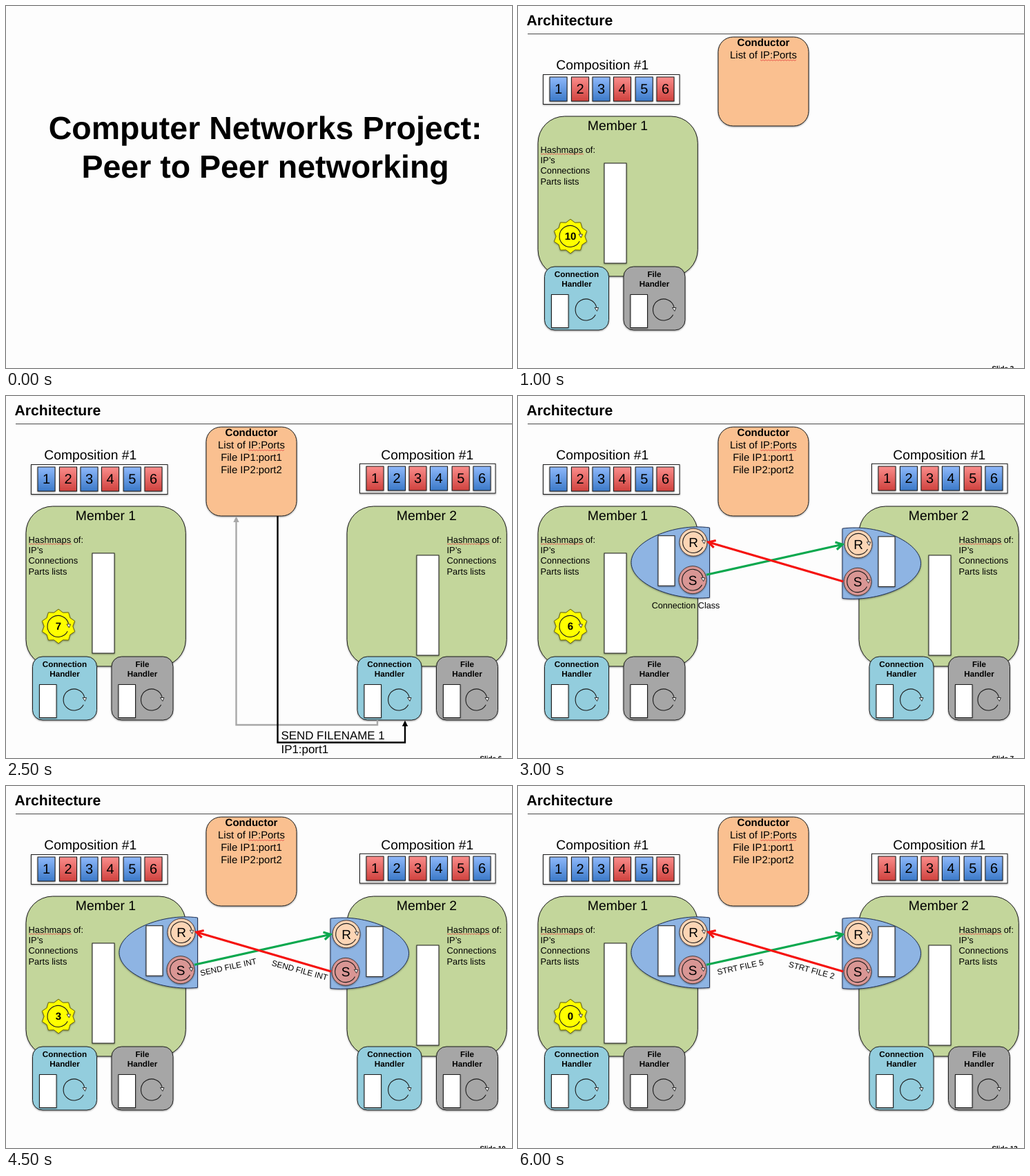
An HTML page that plays this animation: 733x525 px, repeating every 6.5 s.

```html
<!DOCTYPE html>
<html lang="en">
<head>
<meta charset="utf-8">
<title>Peer to Peer networking</title>
<style>
html, body { margin: 0; width: 100%; height: 100%; overflow: hidden; background: #fdfdfd; }
svg { display: block; width: 733px; height: 525px; font-family: "Liberation Sans", Arial, sans-serif; text-rendering: geometricPrecision; }
.shade { filter: drop-shadow(0 1.5px 1px rgba(0,0,0,.4)); }
</style>
</head>
<body>
<svg id="stage" viewBox="0 0 733 525" xmlns="http://www.w3.org/2000/svg">
<defs>
<linearGradient id="blue" x2="0" y2="1"><stop stop-color="#8fb9fb"/><stop offset="1" stop-color="#3b79c8"/></linearGradient>
<linearGradient id="red" x2="0" y2="1"><stop stop-color="#fa8d8b"/><stop offset="1" stop-color="#cf423e"/></linearGradient>
</defs>
</svg>
<script>
const STEP = 500, SLIDES = 13, INK = '#1c1c1c';
const stage = document.getElementById('stage');
const scenes = [];

function add(parent, tag, attrs, content) {
  const el = document.createElementNS('http://www.w3.org/2000/svg', tag);
  for (const k in attrs) el.setAttribute(k, attrs[k]);
  if (content !== undefined) el.textContent = content;
  parent.appendChild(el);
  return el;
}

// A group visible on slides first..last
function scene(first, last = SLIDES - 1) {
  const el = add(stage, 'g', {});
  scenes.push({ el, first, last });
  return el;
}

function text(g, x, y, size, str, opt = {}) {
  return add(g, 'text', { x, y, 'font-size': size, 'text-anchor': 'middle', ...opt }, str);
}
const bold = { 'font-weight': 700 };
const left = { 'text-anchor': 'start' };

function box(g, x, y, width, height, fill = '#fff', rx = 0) {
  return add(g, 'rect', { x, y, width, height, rx, fill, stroke: INK, class: 'shade' });
}

function line(g, d, stroke, width) {
  return add(g, 'path', { d, fill: 'none', stroke, 'stroke-width': width });
}

function squiggle(g, x1, x2, y) {
  let d = `M${x1} ${y}`;
  for (let x = x1 + 2, i = 0; x <= x2; x += 2, i++) d += `L${x} ${y + (i % 2 ? 0 : 1.4)}`;
  line(g, d, '#e8403c', 0.8);
}

function spin(g, x, y, r) {
  const at = deg => {
    const a = deg * Math.PI / 180;
    return `${x + r * Math.cos(a)} ${y + r * Math.sin(a)}`;
  };
  line(g, `M${at(28)}A${r} ${r} 0 1 1 ${at(-14)}`, INK, 1.1);
  add(g, 'path', { d: `M${x + r - 3} ${y - 3}h5.4l-2 5z`, fill: '#fff', stroke: INK, 'stroke-width': 0.9 });
}

function star(g, x, y, r) {
  const pts = [];
  for (let i = 0; i < 20; i++) {
    const a = i * Math.PI / 10 - Math.PI / 2, q = i % 2 ? r * 0.84 : r;
    pts.push([x + q * Math.cos(a), y + q * Math.sin(a)]);
  }
  add(g, 'polygon', { points: pts.join(' '), fill: '#ff0', stroke: '#6b6500', class: 'shade' });
}

function blocks(g, x, y) {
  return [0, 31.5, 62, 92.5, 124.2, 155].map((dx, i) => {
    const tile = box(g, x + dx, y, 25, 35);
    text(g, x + dx + 12.6, y + 24, 20, i + 1);
    return tile;
  });
}

function member(g, n, x, listX, queueX, queueY) {
  box(g, x, 160, 231.3, 232, '#c3d69b', 38.6);
  text(g, x + 115.5, 180, 19.4, 'Member ' + n);
  squiggle(g, listX, listX + 62, 214);
  ['Hashmaps of:', 'IP’s', 'Connections', 'Parts lists'].forEach((s, i) =>
    text(g, listX - 0.5, 212.7 + i * 15.3, 12.9, s, left));
  box(g, queueX, queueY, 32, 145);
}

function handlers(g, dx) {
  const make = (x, w, fill, name, spinX) => {
    box(g, x, 378, w, 92, fill, 14.5);
    text(g, x + w / 2, 392.6, 11.7, name, bold);
    text(g, x + w / 2, 406.7, 11.7, 'Handler', bold);
    box(g, x + 10, 418.5, 24.5, 48);
    spin(g, spinX, 440.5, 15.5);
  };
  make(38.5 + dx, 93, '#93cddd', 'Connection', 98.6 + dx);
  make(153 + dx, 89, '#a6a6a6', 'File', 211 + dx);
}

function worker(g, x, y, fill, letter) {
  add(g, 'circle', { cx: x, cy: y, r: 20, fill, stroke: '#4a3a36', class: 'shade' });
  spin(g, x, y, 15.3);
  text(g, x, y + 7, 19, letter);
}

// Connection class: D-shape, queue and the two workers
function link(g, edge, dir, queueX, y, xr, yr) {
  const px = d => edge + dir * d;
  add(g, 'path', {
    d: `M${edge} ${y + 1.5}C${px(52)} ${y - 5.5} ${px(113.5)} ${y + 21} ${px(113.5)} ${y + 52}` +
       `S${px(52)} ${y + 108.5} ${edge} ${y + 102.8}Z`,
    fill: '#8eb4e3', stroke: '#1d2f55', class: 'shade'
  });
  box(g, queueX, y + 13.2, 24, 72.5);
  worker(g, xr, yr, '#fcd5b5', 'R');
  worker(g, xr - 1, yr + 54.5, '#d99694', 'S');
}

function ray(g, x1, y1, x2, y2, color) {
  line(g, `M${x1} ${y1}L${x2} ${y2}`, color, 3.2);
  const a = Math.atan2(y2 - y1, x2 - x1);
  const wing = s => `${x2 - 11 * Math.cos(a + s)} ${y2 - 11 * Math.sin(a + s)}`;
  line(g, `M${wing(0.52)}L${x2} ${y2}L${wing(-0.52)}`, color, 3.2);
}

function route(g, d, x, y, color) {
  line(g, d, color, 2.4);
  add(g, 'path', { d: `M${x} ${y}l4.2 8.5h-8.4z`, fill: color });
}

function messages(g, a, b) {
  text(g, 0, 4.2, 11.8, a, { transform: 'translate(322 262.5) rotate(-12.3)' });
  text(g, 0, 4.2, 11.8, b, { transform: 'translate(425.5 267) rotate(15)' });
}

let g = scene(0, 0);
text(g, 375.6, 193, 46.5, 'Computer Networks Project:', bold);
text(g, 375.6, 249, 46.5, 'Peer to Peer networking', bold);

g = scene(1);
text(g, 12.5, 28, 21.2, 'Architecture', { ...left, ...bold });
line(g, 'M14 40.5H733', '#4a4a4a', 1);
const page = text(g, 686.5, 529.2, 9.9, '', { ...left, ...bold });
box(g, 290, 45, 131, 129, '#fac090', 21.5);
text(g, 355.5, 58.3, 15, 'Conductor', bold);
text(g, 355.5, 76, 14.9, 'List of IP:Ports');
squiggle(g, 351, 404, 78);
text(g, 122.3, 92, 19.3, 'Composition #1');
box(g, 36.5, 99.5, 197.5, 43);
const tilesA = blocks(g, 46, 103);
member(g, 1, 29, 33, 125, 228);

g = scene(2);
handlers(g, 0);
star(g, 76, 334, 24.8);
spin(g, 75.5, 334, 15.5);
const count = text(g, 76, 338.7, 15, '', bold);

text(scene(3), 355.5, 93.7, 14.9, 'File IP1:port1');

g = scene(3, 4);
route(g, 'M108.5 470V496.5H333.5V180', 333.5, 174.5, '#000');
text(g, 220.5, 490.3, 16.9, 'DOWN FILENAME PORT');

g = scene(4, 4);
route(g, 'M393.5 174V540H60.5V476', 60.5, 470.5, '#000');
text(g, 190.5, 520.6, 16.9, 'NONE FILENAME');

g = scene(5);
text(g, 355.5, 111.5, 14.9, 'File IP2:port2');
text(g, 610.3, 92, 19.3, 'Composition #1');
box(g, 512.5, 98.3, 196.5, 42.7);
const tilesB = blocks(g, 522, 102);
member(g, 2, 494, 639, 595, 231);
handlers(g, 470.5);

g = scene(5, 5);
route(g, 'M538 470V477H333.5V180', 333.5, 174.5, '#a8a8a8');
route(g, 'M393.5 174V502.5H578V476', 578, 470.5, '#000');
text(g, 398.5, 497.8, 16.9, 'SEND FILENAME 1', left);
text(g, 398.5, 518, 16.9, 'IP1:port1', left);

g = scene(6);
link(g, 277.5, -1, 203, 189.5, 254, 212.2);
link(g, 470, 1, 522, 190.7, 493, 214.8);
ray(g, 273, 259.3, 470, 215.3, '#0ba84e');
ray(g, 471, 269, 276, 212, '#f5120f');

g = scene(6, 7);
text(g, 243, 307.5, 12.6, 'Connection Class');

g = scene(7, 8);
add(g, 'rect', { x: 203, y: 257.5, width: 24, height: 16, fill: '#00b050', stroke: INK });
add(g, 'rect', { x: 522, y: 259, width: 24, height: 16, fill: '#00b050', stroke: INK });

messages(scene(9, 10), 'SEND FILE INT', 'SEND FILE INT');
messages(scene(11), 'STRT FILE 5', 'STRT FILE 2');

function paint(tiles, owned) {
  tiles.forEach((t, i) => t.setAttribute('fill', owned.includes(i + 1) ? 'url(#blue)' : 'url(#red)'));
}

let shown = -1;
function draw(ms) {
  const n = Math.floor(ms % (STEP * SLIDES) / STEP);
  if (n === shown) return;
  shown = n;
  for (const s of scenes) s.el.setAttribute('display', n >= s.first && n <= s.last ? 'inline' : 'none');
  const swapped = n >= 12;
  paint(tilesA, swapped ? [1, 2, 3, 5] : [1, 3, 5]);
  paint(tilesB, swapped ? [2, 4, 5, 6] : [2, 4, 6]);
  page.textContent = 'Slide ' + (n + 1);
  count.textContent = 12 - n;
}

const start = performance.now();
function tick() {
  draw(performance.now() - start);
  requestAnimationFrame(tick);
}
tick();
</script>
</body>
</html>
```
